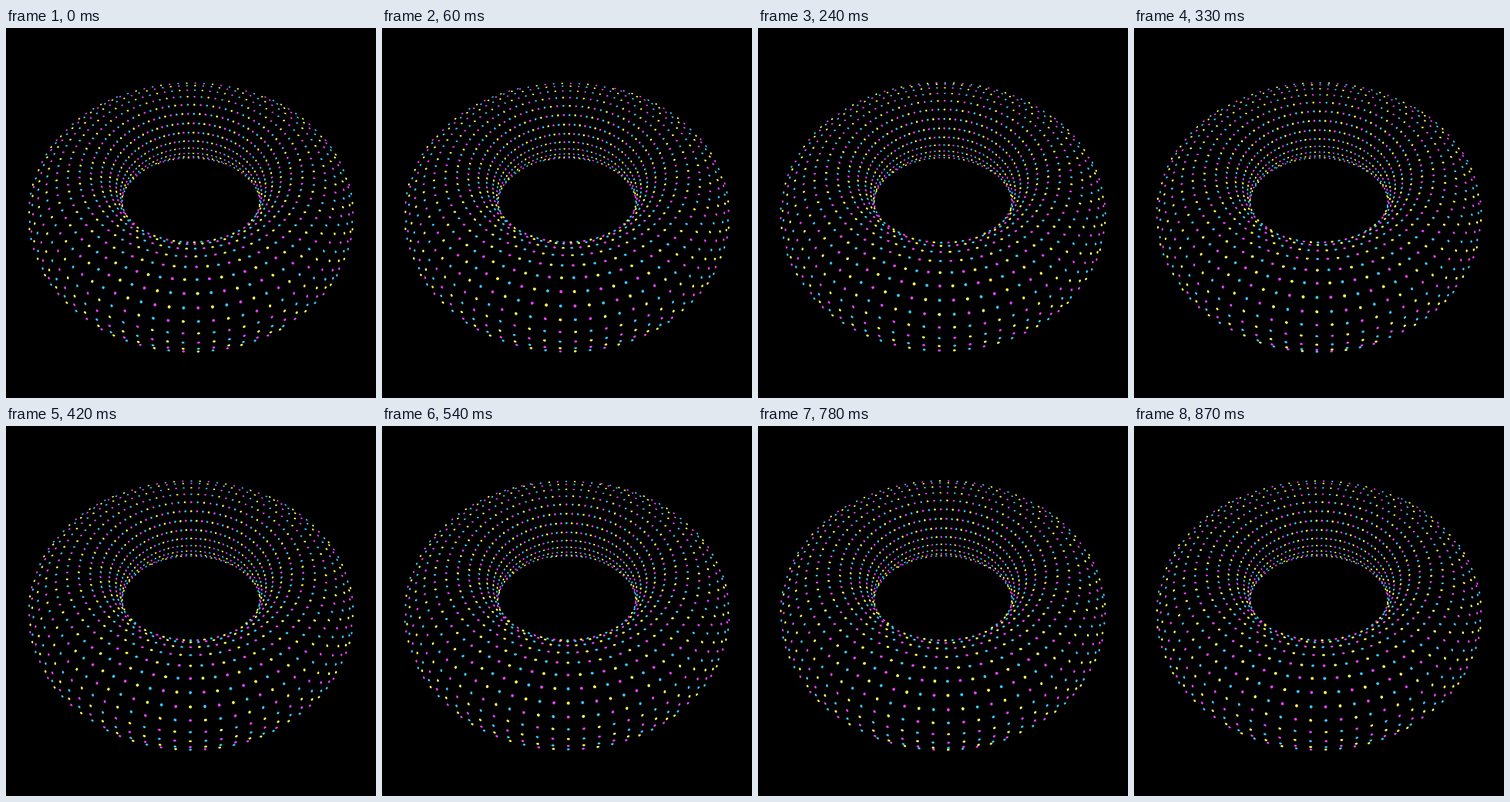
An HTML page with a canvas that plays this animation: 480x480 px, repeating every 900 ms.

```html
<!DOCTYPE html>
<html lang="en">
<head>
<meta charset="utf-8">
<title>Dotted torus</title>
<style>
  html, body { margin: 0; width: 100%; height: 100%; overflow: hidden; background: #000; }
  canvas { display: block; width: 480px; height: 480px; }
</style>
</head>
<body>
<canvas id="stage" width="480" height="480"></canvas>
<script>
const ctx = document.getElementById('stage').getContext('2d');
const TAU = Math.PI * 2;
const LOOP = 900, STEP = 30;

// Torus, camera and grid
const RING = 145.5, TUBE = 56.3, DIST = 540;
const TILT = 48.9 * Math.PI / 180;
const CX = 240, CY = 213.6;
const COLS = 84, ROWS = 27;
const DOT = 1.45;
const COLORS = ['#ffff52', '#35c9ff', '#eb41ff'];

const sinE = Math.sin(TILT), cosE = Math.cos(TILT);

function drawDot(u, v, color) {
  const su = Math.sin(u), cu = Math.cos(u);
  const cv = Math.cos(v), sv = Math.sin(v);
  const out = [su, -cu * sinE, cu * cosE];
  const up = [0, cosE, sinE];
  const n = out.map((o, i) => cv * o + sv * up[i]);
  const [x, y, z] = out.map((o, i) => RING * o + TUBE * n[i]);

  // Skip the side turned away from the camera
  const depth = DIST - z;
  const facing = (n[2] * depth - n[0] * x - n[1] * y) / Math.hypot(x, y, depth);
  if (facing <= -0.03) return;

  const scale = DIST / depth;
  const size = DOT * scale;
  ctx.fillStyle = color;
  ctx.beginPath();
  ctx.ellipse(CX + x * scale, CY - y * scale,
    size * Math.max(facing, 0.7), size, Math.atan2(-n[1], n[0]), 0, TAU);
  ctx.fill();
}

// Each loop moves every dot one column along and two rows around,
// which lands it on a dot of the same colour
function draw(time) {
  const p = Math.floor((time % LOOP) / STEP) * STEP / LOOP;
  ctx.fillStyle = '#000';
  ctx.fillRect(0, 0, 480, 480);
  for (let col = 0; col < COLS; col++) {
    const u = (col - 0.51 + p) / COLS * TAU;
    for (let row = 0; row < ROWS; row++) {
      const v = (row + 2.825 + 2 * p) / ROWS * TAU;
      drawDot(u, v, COLORS[(col + row) % 3]);
    }
  }
}

function tick() {
  draw(performance.now());
  requestAnimationFrame(tick);
}
tick();
</script>
</body>
</html>
```
